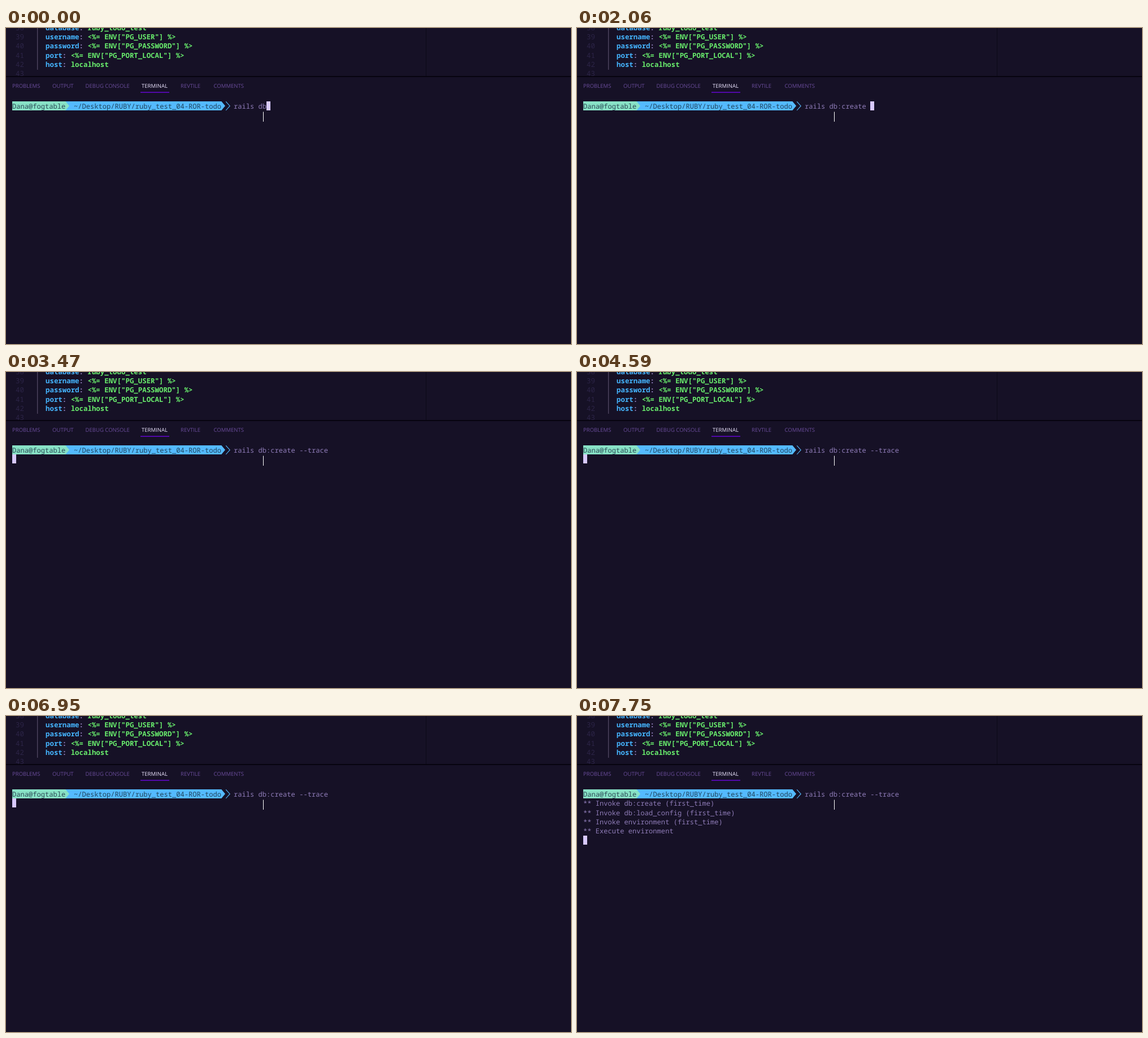
Animation, 1000 px wide and 560 px high, one loop 8000 ms. Source, as an HTML page:

```html
<!DOCTYPE html>
<html lang="en">
<head>
<meta charset="utf-8">
<title>Terminal</title>
<style>
  html, body { margin: 0; width: 100%; height: 100%; overflow: hidden; background: #161126; }
  svg { display: block; width: 1000px; height: 560px; }
  text { white-space: pre; text-rendering: geometricPrecision; }
  .mono { font-family: "Noto Sans Mono", monospace; }
  #editor { font-size: 12.42px; font-weight: 600; }
  #terminal { font-size: 12.1px; font-weight: 500; fill: #8f7cb8; }
  #tabs { font: 9.55px "Open Sans", sans-serif; fill: #6a4c9b; }
  .number { fill: #2c2447; font-weight: 400; }
  .key { fill: #45b5ff; }
  .colon { fill: #8f7cb8; }
  .value { fill: #69ee6d; }
  .active { fill: #ece4ff; }
</style>
</head>
<body>
<svg viewBox="0 0 1000 560">
  <rect width="1000" height="560" fill="#161126"/>
  <g id="editor" class="mono">
    <path d="M55.7 0V74" stroke="#574d69" stroke-width="1.2"/>
    <path d="M743.5 0V85" stroke="#0d0918"/>
  </g>
  <rect y="85" width="1000" height="475" fill="#161126"/>
  <rect y="85" width="1000" height="2" fill="#07040f"/>
  <g id="tabs"></g>
  <rect x="238" y="113.3" width="51" height="1.5" fill="#6507d4"/>
  <g id="terminal" class="mono">
    <path d="M105 130H381.3L388 138L381.3 146H105Z" fill="#54baff"/>
    <path d="M11 130H105.4L112 138L105.4 146H11Z" fill="#88e2c6"/>
    <path d="M389.2 130.4L396.2 138.2L389.2 146" fill="none" stroke="#54baff" stroke-width="1.1"/>
  </g>
  <rect id="cursor" width="7" height="16" fill="#d8c9ff"/>
  <path d="M455.5 148.5V166" stroke="#fff"/>
</svg>
<script>
const LOOP = 8000;
const LEFT = 11, TOP = 130, CELL = 7.26, ROW = 16.35;
const PROMPT_CELLS = 54;
const command = "rails db:create --trace";

const $ = id => document.getElementById(id);

function addText(parent, x, y, parts) {
  const node = document.createElementNS("http://www.w3.org/2000/svg", "text");
  node.setAttribute("x", x);
  node.setAttribute("y", y);
  for (const [string, style] of parts) {
    const span = document.createElementNS(node.namespaceURI, "tspan");
    span.textContent = string;
    if (style) span.setAttribute("class", style);
    node.append(span);
  }
  parent.append(node);
  return node;
}

const config = [
  ["database", "ruby_todo_test"],
  ["username", '<%= ENV["PG_USER"] %>'],
  ["password", '<%= ENV["PG_PASSWORD"] %>'],
  ["port", '<%= ENV["PG_PORT_LOCAL"] %>'],
  ["host", "localhost"],
  []
];
config.forEach(([key, value], i) => {
  const y = 3.7 + i * ROW;
  addText($("editor"), 17, y, [[String(38 + i), "number"]]);
  if (key) addText($("editor"), 70, y, [[key, "key"], [": ", "colon"], [value, "value"]]);
});

const tabs = [[11, "PROBLEMS"], [82, "OUTPUT"], [140.5, "DEBUG CONSOLE"],
  [240, "TERMINAL", "active"], [309, "REVTILE"], [367.5, "COMMENTS"]];
for (const [x, label, style] of tabs) addText($("tabs"), x, 106.4, [[label, style]]);

const cellText = (col, row, string) =>
  addText($("terminal"), LEFT + col * CELL, TOP + 12.8 + row * ROW, [[string]]);

cellText(0, 0, "Dana@fogtable").setAttribute("fill", "#2c4d58");
cellText(15, 0, "~/Desktop/RUBY/ruby_test_04-ROR-todo").setAttribute("fill", "#1f465a");
const typed = cellText(PROMPT_CELLS, 0, "").firstChild;
const output = [
  "** Invoke db:create (first_time)",
  "** Invoke db:load_config (first_time)",
  "** Invoke environment (first_time)",
  "** Execute environment"
].map((line, i) => cellText(0, i + 1, line));

// [time, characters typed]
const typing = [[0, 8], [580, 9], [730, 10], [850, 11], [980, 12], [1130, 13], [1380, 15],
  [2060, 16], [2520, 18], [2670, 19], [2820, 20], [2940, 21], [3090, 22], [3210, 23]];
const ENTER = 3470, PRINT = 7750;
const blinks = [4040, 4590, 5300, 5890, 6390, 6950, 7600, PRINT];

function render(time) {
  const count = typing.filter(([at]) => at <= time).pop()[1];
  const entered = time >= ENTER, printed = time >= PRINT;
  const col = entered ? 0 : PROMPT_CELLS + count;
  const row = printed ? output.length + 1 : entered ? 1 : 0;
  const hidden = blinks.filter(at => at <= time).length % 2;

  typed.textContent = command.slice(0, count);
  for (const line of output) line.setAttribute("visibility", printed ? "visible" : "hidden");
  $("cursor").setAttribute("x", Math.round(LEFT + col * CELL));
  $("cursor").setAttribute("y", Math.round(TOP + row * ROW));
  $("cursor").setAttribute("visibility", hidden ? "hidden" : "visible");
}

const start = performance.now();
function tick() {
  render((performance.now() - start) % LOOP);
  requestAnimationFrame(tick);
}
tick();
</script>
</body>
</html>
```
